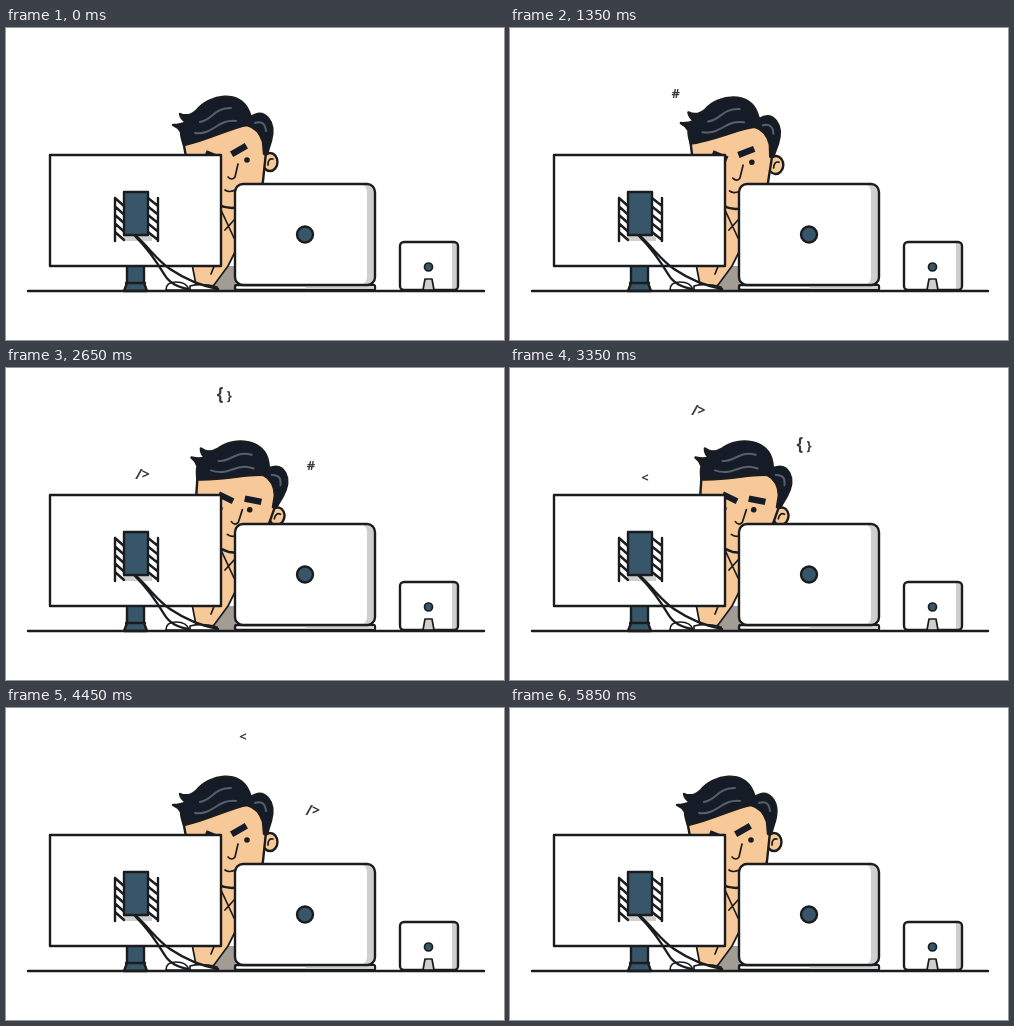
An HTML page for the animation above (5900 ms loop, 498 by 312 pixels).

```html
<!DOCTYPE html>
<html lang="en">
<head>
<meta charset="utf-8">
<title>Coder at the desk</title>
<style>
  html, body { margin: 0; width: 100%; height: 100%; overflow: hidden; background: #fff; }
  svg { display: block; width: 498px; height: 312px; }
  .ink { stroke: #1a1c1e; stroke-width: 2.4; stroke-linejoin: round; stroke-linecap: round; }
  .line { fill: none; }
  .thin { stroke-width: 1.7; }
  .paper { fill: #fff; }
  .skin { fill: #f7c898; }
  .blue { fill: #38566a; }
  .shade { fill: #cfcfcf; }
  .shirt { fill: #a39c95; }
  .hair { fill: #151c27; }
  .shine { fill: none; stroke: #56606a; stroke-width: 2; stroke-linecap: round; }
  .sign { font: bold 13px "Open Sans", "Noto Sans", sans-serif; fill: #3a3a3c; text-anchor: middle; }
</style>
</head>
<body>
<svg viewBox="0 0 498 312">
  <g id="signs"></g>

  <!-- body and arm -->
  <path class="shirt" d="M212 238H230V262H205Z"/>
  <path class="ink thin skin" d="M186 236L190 257Q199 264 208 257L222 238L230 222V164H212V236Z"/>
  <path class="ink thin line" d="M215 182L228 210M219 202L228 192M213 226L205 246"/>
  <path class="ink thin paper" d="M184 258Q196 255 211 259V262H184Z"/>

  <g id="head">
    <ellipse class="ink skin" cx="264" cy="134" rx="7.5" ry="9"/>
    <path class="ink thin line" d="M262 137Q262 130 267 131"/>
    <path class="ink skin" d="M177 112L182 140Q198 179 226 180Q253 178 257 153L260 124L257 98L228 88Z"/>
    <path id="nose" class="ink line thin" d="M232 136L229 149Q226 153 222 149M219 162Q223 165 229 162"/>
    <g id="eyes">
      <circle cx="241" cy="132" r="2.8" fill="#1a1c1e"/>
      <circle cx="212" cy="138" r="2.6" fill="#1a1c1e"/>
    </g>
    <g id="brows" fill="#151c27">
      <rect id="browR" x="-8.5" y="-3.2" width="17" height="6.4"/>
      <rect id="browL" x="-8" y="-3" width="16" height="6"/>
    </g>
    <path class="ink hair" d="M178 117Q175 109 175 104Q172 99 167 97Q175 97 180 94Q175 91 174 86Q183 90 191 82C203 67 234 61 243 84Q244 87 245 89Q255 82 262 90Q269 98 265 113L261 126H258L257 114Q253 100 241 97C226 99 203 112 178 117Z"/>
    <path class="shine" d="M194 94C207 92 207 80 225 80M189 105C208 107 211 91 230 93M249 95Q259 92 260 103"/>
  </g>

  <!-- monitor -->
  <path class="ink blue" d="M121 236H138V255L141 263H118L121 255Z"/>
  <path class="ink line" d="M120 255H139"/>
  <rect class="ink paper" x="44" y="127" width="171" height="111"/>
  <rect class="shade" x="117" y="206" width="29" height="7"/>
  <path id="fins" class="ink line"/>
  <rect class="ink blue" x="118" y="164" width="24" height="43"/>

  <!-- mouse and cables -->
  <path class="ink thin paper" d="M160 262Q160 254 170 254Q181 254 183 262Z"/>
  <path class="ink line" d="M129 208C143 222 152 236 158 246S172 259 182 261M130 208C145 222 152 233 164 241S190 257 212 261"/>

  <!-- laptop -->
  <rect class="ink paper" x="229" y="257" width="140" height="5" rx="2"/>
  <rect class="shade" x="300" y="258" width="68" height="3"/>
  <rect class="paper" x="229" y="156" width="140" height="101" rx="8"/>
  <path class="shade" d="M360 157Q368 158 368 165V249Q368 256 357 256Q361 254 361 248V164Q361 159 357 157Z"/>
  <rect class="ink line" x="229" y="156" width="140" height="101" rx="8"/>
  <circle class="ink blue" cx="299" cy="206.5" r="8"/>

  <!-- tablet -->
  <rect class="paper" x="394" y="214" width="58" height="48" rx="4"/>
  <path class="shade" d="M446 215H449Q451 216 451 219V257Q451 261 446 261Z"/>
  <rect class="ink line" x="394" y="214" width="58" height="48" rx="4"/>
  <circle class="ink thin blue" cx="422.5" cy="239" r="4"/>
  <path class="ink thin shade" d="M419 251H426L428 262H417Z"/>

  <path class="ink line" d="M22 263H478"/>
</svg>
<script>
const LOOP = 5900, STEP = 50;
const $ = id => document.getElementById(id);

// Shared flight over the head: [time, x, y]
const FLIGHT = [
  [550, 130, 134], [750, 132, 116], [1000, 142, 99], [1550, 183, 46],
  [1850, 225, 26], [2300, 275, 49], [2500, 294, 77], [2650, 305, 97],
  [3200, 322, 145], [3380, 325, 168]
];
const SIGNS = [
  { delay: 0, parts: [['#', 13]] },
  { delay: 850, parts: [['{', 17], [' }', 13]] },
  { delay: 1750, parts: [['/', 14, 'italic'], ['>', 14]] },
  { delay: 2500, parts: [['<', 13]] }
];

const NS = 'http://www.w3.org/2000/svg';
function add(parent, tag, text) {
  const el = parent.appendChild(document.createElementNS(NS, tag));
  if (text) el.textContent = text;
  return el;
}

for (const sign of SIGNS) {
  sign.el = add($('signs'), 'text');
  sign.el.setAttribute('class', 'sign');
  sign.el.setAttribute('y', 5);
  for (const [char, size, slant = 'normal'] of sign.parts) {
    const span = add(sign.el, 'tspan', char);
    span.style.fontSize = size + 'px';
    span.style.fontStyle = slant;
    span.style.whiteSpace = 'pre';
  }
}

let fins = 'M109 170V213M152 170V213';
for (let y = 170; y < 206; y += 8.5) fins += `M109 ${y}L118 ${y + 8}M142 ${y}L152 ${y + 8}`;
$('fins').setAttribute('d', fins);

// Smooth curve through unevenly timed points
function slope(i, k) {
  const a = FLIGHT[Math.max(i - 1, 0)], b = FLIGHT[Math.min(i + 1, FLIGHT.length - 1)];
  return (b[k] - a[k]) / (b[0] - a[0]);
}
function flightAt(t) {
  const last = FLIGHT.length - 1;
  if (t < FLIGHT[0][0] || t >= FLIGHT[last][0]) return null;
  const i = FLIGHT.findIndex(p => p[0] > t) - 1;
  const a = FLIGHT[i], b = FLIGHT[i + 1], span = b[0] - a[0], s = (t - a[0]) / span;
  return [1, 2].map(k =>
    a[k] * (1 + 2 * s) * (1 - s) ** 2 + b[k] * s * s * (3 - 2 * s) +
    span * (slope(i, k) * s * (1 - s) ** 2 - slope(i + 1, k) * s * s * (1 - s)));
}

function ease(t, from, to) {
  const s = Math.min(1, Math.max(0, (t - from) / (to - from)));
  return s * s * (3 - 2 * s);
}

const move = (el, value) => el.setAttribute('transform', value);

function draw(t) {
  for (const sign of SIGNS) {
    const p = flightAt(t - sign.delay);
    sign.el.style.display = p ? '' : 'none';
    if (p) move(sign.el, `translate(${p[0]} ${p[1]})`);
  }
  // 0 = leaning at the screen, 1 = nodded towards the laptop
  const nod = ease(t, 1200, 1700) - ease(t, 3850, 4370);
  const tilt = -30 + 28 * nod;
  move($('head'), `translate(${3 * nod} ${-nod}) rotate(${13.7 * nod} 202 158)`);
  move($('eyes'), `translate(${-5 * nod} ${2 * nod})`);
  move($('nose'), `translate(${-2 * nod} 0) rotate(${-9 * nod} 229 143)`);
  move($('browR'), `translate(${233 + 4 * nod} ${122 + 2 * nod}) rotate(${tilt})`);
  move($('browL'), `translate(${207 + 3 * nod} ${128}) rotate(${22 - 10 * nod})`);
}

const start = performance.now();
function tick() {
  const t = (performance.now() - start) % LOOP;
  draw(Math.floor(t / STEP) * STEP);
  requestAnimationFrame(tick);
}
draw(0);
requestAnimationFrame(tick);
</script>
</body>
</html>
```
